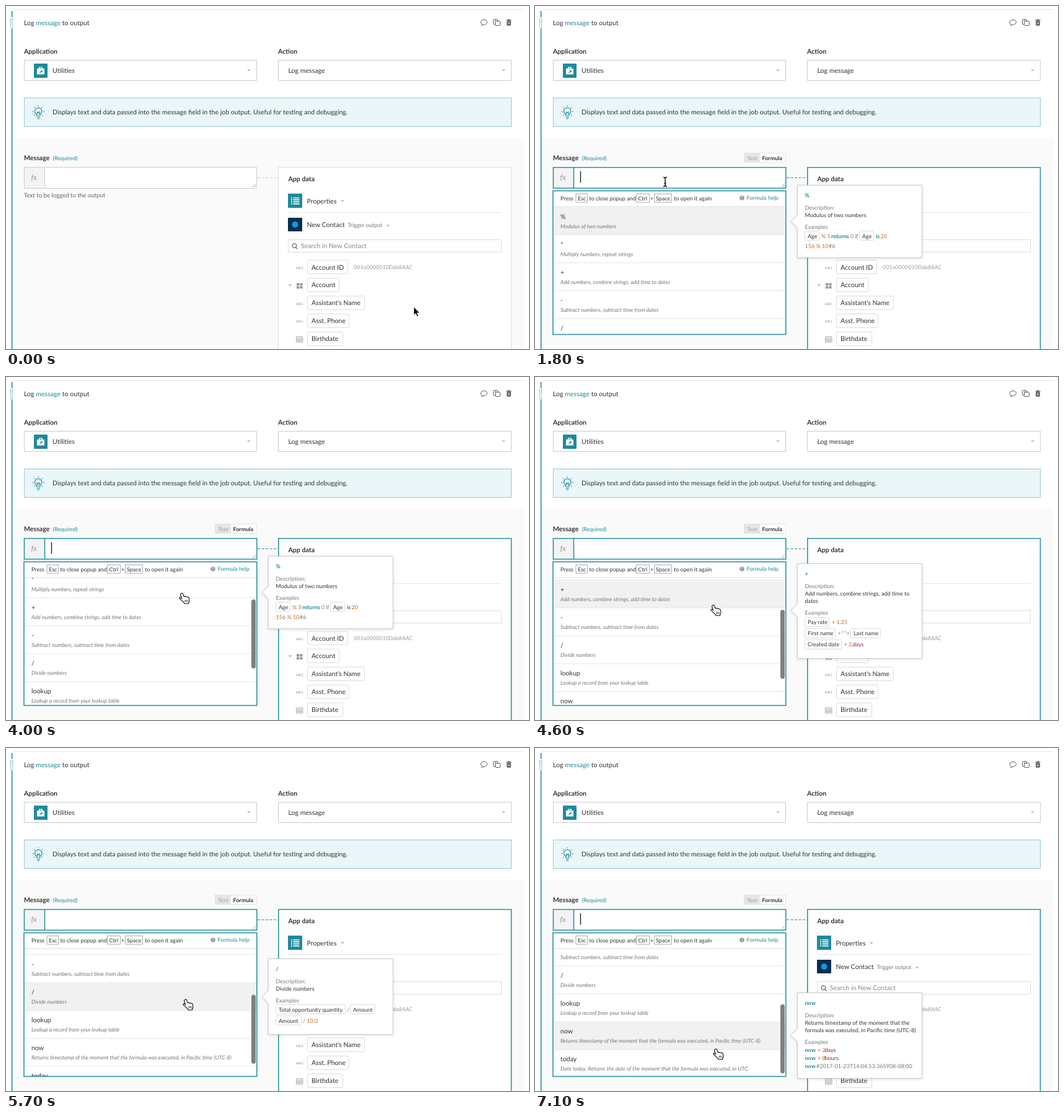
Animation, 844 px wide and 554 px high, one loop 7200 ms. Source, as an HTML page:

```html
<!DOCTYPE html>
<html lang="en">
<head>
<meta charset="utf-8">
<title>Formula mode</title>
<style>
  html, body { margin: 0; width: 100%; height: 100%; overflow: hidden; background: #fff; }
  svg { display: block; width: 844px; height: 554px; cursor: default; }
  text { font: 10.6px Lato, sans-serif; fill: #333; text-rendering: geometricPrecision; white-space: pre; }
  .b { font-weight: 700; }
  .s { font-size: 9px; }
  .i { font-size: 8.8px; font-style: italic; fill: #777; }
  .g { fill: #777; }
  .t { fill: #1f8a9b; }
  .o { fill: #c8691c; }
  .k { fill: #8d1d4f; }
  .abc { font-size: 5px; font-weight: 700; letter-spacing: .9px; fill: #999; }
  .box { fill: #fff; stroke: #ccc; }
  .pill { fill: #fff; stroke: #ddd; }
  .tri { fill: #bbb; }
  .line { stroke: #e6e6e6; fill: none; }
  .teal { fill: #1f8a9b; }
  .ico { fill: none; stroke: #555; }
  .focus { fill: none; stroke: #2b93a3; stroke-width: 1.6; }
  .tip { filter: drop-shadow(0 1px 2px #0002); }
</style>
</head>
<body>
<svg viewBox="0 0 844 554">
  <defs>
    <clipPath id="view"><path d="M30 324.5H404V530H30z"/></clipPath>
  </defs>

  <!-- card -->
  <path class="line" d="M10 5.5H836"/>
  <path fill="#fafafa" d="M11 213H836V554H11z"/>
  <path d="M9.7 8V18M9.7 36V554" stroke="#2b8c9b" stroke-width="1.6"/>
  <path d="M7.5 20V35M10.5 20V35" stroke="#4a9dab" stroke-width="1.4" stroke-dasharray="1.4 1.4"/>
  <text x="29" y="30.5">Log <tspan class="t">message</tspan> to output</text>
  <path class="ico" d="M767.5 31.5q.6-1 .5-2.2c-4-3-1-7 3.500-7s6.500 4 3.500 6.500c-2 1.500-3.500 1.500-5 1.300q-1 1.200-2.500 1.400z"/>
  <path class="ico" d="M789.500 24.500V22.500q0-1 -1-1h-1q-1 0-1 1v6q0 1 1 1h2M790.500 24.500h6q1 0 1 1v5q0 1-1 1h-6q-1 0-1-1v-5q0-1 1-1zM789.500 21.500h3q1 0 1 1v2"/>
  <path fill="#444" d="M807.500 22.500h2.500v-1h3v1h2.500v1.300h-8zM808.200 24.500h6.600v6q0 1-1 1h-4.600q-1 0-1-1z"/>
  <path stroke="#fff" stroke-width=".7" d="M810 26v4M811.500 26v4M813 26v4"/>

  <text class="b" x="29" y="77">Application</text>
  <text class="b" x="439" y="77">Action</text>
  <path class="box" d="M29.500 87.500h375v33h-375zM439.500 87.500h376v33h-376z"/>
  <path class="tri" d="M389 102.500h6l-3 3zM800 102.500h6l-3 3z"/>
  <rect class="teal" x="45" y="93" width="22" height="23" rx="1"/>
  <path fill="#fff" d="M50 101h3v-2.500h6v2.500h3v9.500H50zM54.500 101h3v-1.200h-3z" fill-rule="evenodd"/>
  <path class="teal" d="M54 107.500l2.500-2.500-1-1.500 3 .5 .5 3-1.500-1-2.500 2.500z"/>
  <text x="75" y="107.800">Utilities</text>
  <text x="455.500" y="107.800">Log message</text>

  <rect x="29.500" y="148.500" width="786" height="46" fill="#ebf6f8" stroke="#94cbd4"/>
  <path fill="none" stroke="#2795a6" stroke-width="1.200" d="M49.500 177v-2q-3-2-3-5a5.700 5.700 0 0 1 11.400 0q0 3-3 5v2zM49.500 179.500h5.500M50.500 181.800h3.500M50.500 175v-4l1.700 1.500 1.700-1.500v4M52.200 160.500v1.800M45.500 163.500l1.200 1.200M59 163.500l-1.200 1.200M42.500 170.500h2M60 170.500h2M45.500 177l1.200-1.200M59 177l-1.200-1.200"/>
  <text x="75" y="174.800" style="font-size:10.5px">Displays text and data passed into the message field in the job output. Useful for testing and debugging.</text>

  <!-- message field -->
  <text class="b" x="29" y="248.700">Message</text>
  <text class="s t" x="75.500" y="248.500">(Required)</text>
  <g id="toggle">
    <rect x="337.500" y="237.500" width="67" height="15" fill="#fff" stroke="#e4e4e4"/>
    <path fill="#e6e6e6" d="M338 238h25v14h-25z"/>
    <text class="s b" x="342" y="248.500" style="fill:#b0b0b0">Text</text>
    <text class="s b" x="366.500" y="248.500">Formula</text>
  </g>
  <path class="box" d="M29.500 260.500h375v34h-375z"/>
  <path fill="#f3f3f3" stroke="#ccc" d="M29.500 260.500h33v34h-33z"/>
  <text x="40.500" y="281" style="font-style:italic;font-size:12px;fill:#999">fx</text>
  <path stroke="#aaa" d="M397.500 292.500l5.500-5.500M400.500 292.500l2.500-2.500"/>
  <text x="29" y="308.500" style="font-size:9.650px;fill:#666">Text to be logged to the output</text>
  <path id="link" d="M406 277.500H439" stroke="#ccc" stroke-dasharray="4 2.500"/>

  <!-- data panel -->
  <rect class="box" x="439.500" y="260.500" width="376" height="310" style="stroke:#ddd"/>
  <text class="b" x="455.500" y="283">App data</text>
  <rect class="teal" x="455" y="303" width="23" height="23" rx="1"/>
  <path stroke="#fff" stroke-width="1.700" d="M460 310h2M463.500 310h10M460 313.200h2M463.500 313.200h10M460 316.400h2M463.500 316.400h10M460 319.600h2M463.500 319.600h10"/>
  <text x="485.500" y="319">Properties</text>
  <path class="tri" d="M540 313.500h6l-3 3.200z"/>
  <path class="line" d="M455 333.500H800"/>
  <rect x="455" y="342" width="23" height="22" rx="1" fill="#06304f"/>
  <circle cx="466.500" cy="353" r="5" fill="#1797d6"/>
  <text x="485.500" y="357.200">New Contact</text>
  <text class="s g" x="551.500" y="357.200">Trigger output</text>
  <path class="tri" d="M613.500 355.500h6l-3-3.200z"/>
  <rect class="pill" x="455.500" y="377.500" width="344" height="20"/>
  <path fill="none" stroke="#777" stroke-width="1.400" d="M468 389.200a3.300 3.300 0 1 0-.5.500l3 2.800"/>
  <text x="476" y="391.400" style="fill:#8a8a8a">Search in New Contact</text>
  <g id="fields"></g>
  <text class="s" x="561" y="425.200" style="font-style:italic;fill:#999">001o0000010Dda8AAC</text>
  <path class="tri" d="M455.500 449.500h6l-3 3.200z"/>
  <path fill="#999" d="M469 447.500h4.300v4h-4.300zM474.300 447.500h4.300v4h-4.300zM469 452.500h4.300v4h-4.300zM474.300 452.500h4.300v4h-4.300z"/>
  <path fill="none" stroke="#aaa" stroke-width=".9" d="M468.500 534.500h10.500v8.500h-10.500zM468.500 537h10.500M468.500 540h10.500M471 537v6M473.700 537v6M476.400 537v6M471 533v2M476.400 533v2"/>

  <!-- focused state -->
  <g id="open">
    <path class="focus" d="M29.500 260.800h375.300v33.500h-375.300zM62.500 261v33M439.800 570V260.800h375.700V570"/>
    <path id="caret" d="M73.500 267V285.500" stroke="#222" stroke-width="1.400"/>
    <rect class="focus" x="29" y="298.500" width="375.800" height="232" style="fill:#fff"/>
    <g clip-path="url(#view)">
      <g id="list"></g>
      <rect id="thumb" x="396" width="7" height="111.500" rx="3.500" fill="#808080"/>
    </g>
    <path d="M30 324H404" stroke="#ddd"/>
    <path class="box" d="M66 303.500h18.500v13.500H66zM163.500 303.500h21v13.500h-21zM192.500 303.500h28v13.500h-28z" style="stroke:#aaa"/>
    <text class="s" y="313.500"><tspan x="41">Press</tspan><tspan x="69">Esc</tspan><tspan x="87.500">to close popup and</tspan><tspan x="166.500">Ctrl</tspan><tspan x="186">+</tspan><tspan x="195">Space</tspan><tspan x="224">to open it again</tspan></text>
    <circle cx="334" cy="310" r="3.800" fill="#999"/>
    <text class="b" x="332.300" y="312.400" style="font-size:6.500px;fill:#fff">?</text>
    <text class="s t" x="341.500" y="313">Formula help</text>
    <g id="tips"></g>
  </g>

  <!-- pointers, each with its hot spot at 0,0 -->
  <g id="arrow"><path d="M0 0V13.500l3.200-2.900 2.100 5 2.300-1-2.100-4.800H9.700z" stroke="#fff" stroke-width=".9"/></g>
  <g id="beam" fill="none"><path id="stem" d="M-3-7.500q3 0 3 2V5.500q0 2-3 2M3-7.500q-3 0-3 2V5.500q0 2 3 2M-1.500 2.500h3" stroke="#111" stroke-width="1.500"/></g>
  <g id="hand"><path d="M-3.500 .8q2-1.700 3.200.8l1.300 4q1.500-1.200 3 .4 1.700-.8 2.800.6 2.300-.3 2.700 2l.3 4q-.2 2-1.200 3v1.400H1.800l-.6-1.600L-6 8.600q-.6-2 1.500-1.800l2 1.700-2-6q-.2-1.200 1-1.700z" fill="#fff" stroke="#111" stroke-width="1.100"/><path d="M3 11v3.500M5 11v3.500M7 11v3.500" stroke="#111" stroke-width=".8"/></g>
</svg>
<script>
const $ = id => document.getElementById(id);
const text = (x, y, cls, s) => `<text x="${x}" y="${y}" class="${cls}">${s}</text>`;
const pill = (x, y, w, h) => `<rect class="pill" x="${x}" y="${y}" width="${w}" height="${h}" rx="1"/>`;
const show = (id, on) => { $(id).style.display = on ? '' : 'none'; };
const move = (id, x, y) => $(id).setAttribute('transform', `translate(${x} ${y})`);

const fields = [['Account ID', 65, 1], ['Account', 51], ["Assistant's Name", 92, 1], ['Asst. Phone', 67, 1], ['Birthdate', 57]];
$('fields').innerHTML = fields.map(([name, w, abc], i) => {
  const y = 411 + i * 28.9;
  return pill(486.5, Math.round(y) - .5, w, 22) + text(493, y + 14.500, '', name) +
    (abc ? text(468, y + 13.700, 'abc', 'ABC') : '');
}).join('');

const ROW = 45.1, TOP = 324.5;
const rows = [
  ['%', 'Modulus of two numbers'],
  ['*', 'Multiply numbers, repeat strings'],
  ['+', 'Add numbers, combine strings, add time to dates'],
  ['-', 'Subtract numbers, subtract time from dates'],
  ['/', 'Divide numbers'],
  ['lookup', 'Lookup a record from your lookup table'],
  ['now', 'Returns timestamp of the moment that the formula was executed, in Pacific time (UTC-8)'],
  ['today', 'Date today. Returns the date of the moment that the formula was executed, in UTC.']
];
$('list').innerHTML = rows.map(([name, about], i) => {
  const y = TOP + i * ROW;
  return `<rect id="row${i}" x="30" y="${y}" width="374" height="${ROW}" fill="#f1f1f1"/>` +
    `<path class="line" d="M30 ${y + ROW}H404"/>` +
    text(41, y + 19, '', name) + text(41, y + 34.2, 'i', about);
}).join('');

// Example tokens: [x, class, text] or [x, width, text] for a boxed field
const tips = {
  0: { y: 289, h: 118, at: 348, about: ['Modulus of two numbers'], code: [
    [[436, 23, 'Age'], [462, 'o', '% 5'], [478, 't b', 'returns'], [509, 'o', '0'], [516, 't', 'if'],
     [524, 23, 'Age'], [550, 't b', 'is'], [557.5, 'o', '20']],
    [[435.5, 'o', '156 % 10'], [474, 'g', '#6']]] },
  2: { y: 301, h: 154, at: 377, about: ['Add numbers, combine strings, add time to', 'dates'], code: [
    [[436, 40, 'Pay rate'], [479, 'o', '+ 1.25']],
    [[436, 49, 'First name'], [488.5, 'o', '+'], [495.5, 't b', "' '"], [502.5, 'o', '+'], [510, 48, 'Last name']],
    [[436, 59, 'Created date'], [498.5, 'o', '+ 2.'], [512.5, 'k', 'days']]] },
  4: { y: 340, h: 123, at: 402, about: ['Divide numbers'], code: [
    [[436, 112, 'Total opportunity quantity'], [550, 'o', '/'], [556, 40, 'Amount']],
    [[436, 41, 'Amount'], [479, 'o', '/ 10.0']]] },
  6: { y: 395, h: 139, at: 464, about: ['Returns timestamp of the moment that the', 'formula was executed, in Pacific time (UTC-8)'], code: [
    [[435.5, 't b', 'now'], [456, 'o', '+ 2.'], [467.5, 'k', 'days']],
    [[435.5, 't b', 'now'], [456, 'o', '+ 8.'], [467.5, 'k', 'hours']],
    [[435.5, 't b', 'now'], [454, 'g', '#2017-01-23T14:04:53.365908-08:00']]] }
};
$('tips').innerHTML = Object.entries(tips).map(([i, { y, h, at, about, code }]) => {
  const line = (s, n) => text(435.5, y + 52 + n * 12, 's', s);
  const head = y + 70.5 + (about.length - 1) * 12.5;
  const step = i === '6' ? 13.2 : i === '0' ? 16.5 : 18.2;
  const first = head + (i === '6' ? 12.8 : 15);
  const token = n => ([x, kind, s]) => {
    const b = first + n * step;
    return typeof kind === 'number'
      ? pill(x - .5, Math.round(b - 10.5) - .5, kind, 15) + text(x + 4, b, 's', s)
      : text(x, b, 's ' + kind, s);
  };
  return `<g id="tip${i}"><path class="tip" d="M423.500 ${y + .5}H624.500V${y + h - .5}H423.500V${at + 10.5}L413 ${at}L423.500 ${at - 10.5}z" fill="#fff" stroke="#ccc"/>` +
    text(435.5, y + 20.300, 's t b', rows[i][0]) + text(435.5, y + 39.500, 's g', 'Description:') +
    about.map(line).join('') + text(435.5, head, 's g', 'Examples') +
    code.map((tokens, n) => tokens.map(token(n)).join('')).join('') + '</g>';
}).join('');

// Key points: [time, values...]
const path = [[0, 658, 486], [200, 655, 483], [500, 570, 410], [800, 451, 299], [1000, 235, 286], [1100, 210, 284],
  [1900, 210, 284], [2400, 275, 340], [2550, 286, 354], [2800, 286, 349], [4200, 286, 349], [4700, 291, 373],
  [5100, 291, 373], [5600, 292, 406], [5900, 292, 406], [6400, 293, 450], [6900, 294, 484], [7100, 294, 486]];
const scroll = [[0, 0], [3300, 0], [3900, 58], [4100, 58], [4600, 87], [5100, 87], [5500, 126], [5900, 126], [6500, 153]];
const hover = [[0, 0], [3400, -1], [4400, 2], [5300, 4], [6200, 5], [6700, 6]];
const OPEN = 1800, LOOP = 7200, TICK = 100;

function tween(keys, t) {
  const n = keys.findIndex(k => k[0] > t);
  if (n < 0) return keys.at(-1).slice(1);
  const a = keys[n - 1], b = keys[n], p = (t - a[0]) / (b[0] - a[0]);
  return a.slice(1).map((v, i) => v + (b[i + 1] - v) * p);
}

function draw(t) {
  const open = t >= OPEN;
  const [x, y] = tween(path, t), [offset] = tween(scroll, t);
  const active = hover.findLast(k => k[0] <= t)[1];
  const kind = x > 405 ? 'arrow' : open && y > 298 ? 'hand' : 'beam';

  for (const id of ['arrow', 'beam', 'hand']) show(id, id === kind);
  move(kind, x, y);
  show('toggle', open || kind === 'beam');
  show('open', open);
  show('caret', (t + 200) % 1000 < 500);
  $('link').setAttribute('stroke', open ? '#2b93a3' : '#ccc');

  move('list', 0, -offset);
  rows.forEach((_, i) => show('row' + i, i === active));
  show('thumb', offset > 0);
  $('thumb').setAttribute('y', 326 + offset * .575);
  const tip = active < 0 ? 0 : active;
  for (const i in tips) show('tip' + i, +i === tip);
}

function frame(now) {
  draw(Math.floor(now % LOOP / TICK) * TICK);
  requestAnimationFrame(frame);
}
draw(0);
requestAnimationFrame(frame);
</script>
</body>
</html>
```
